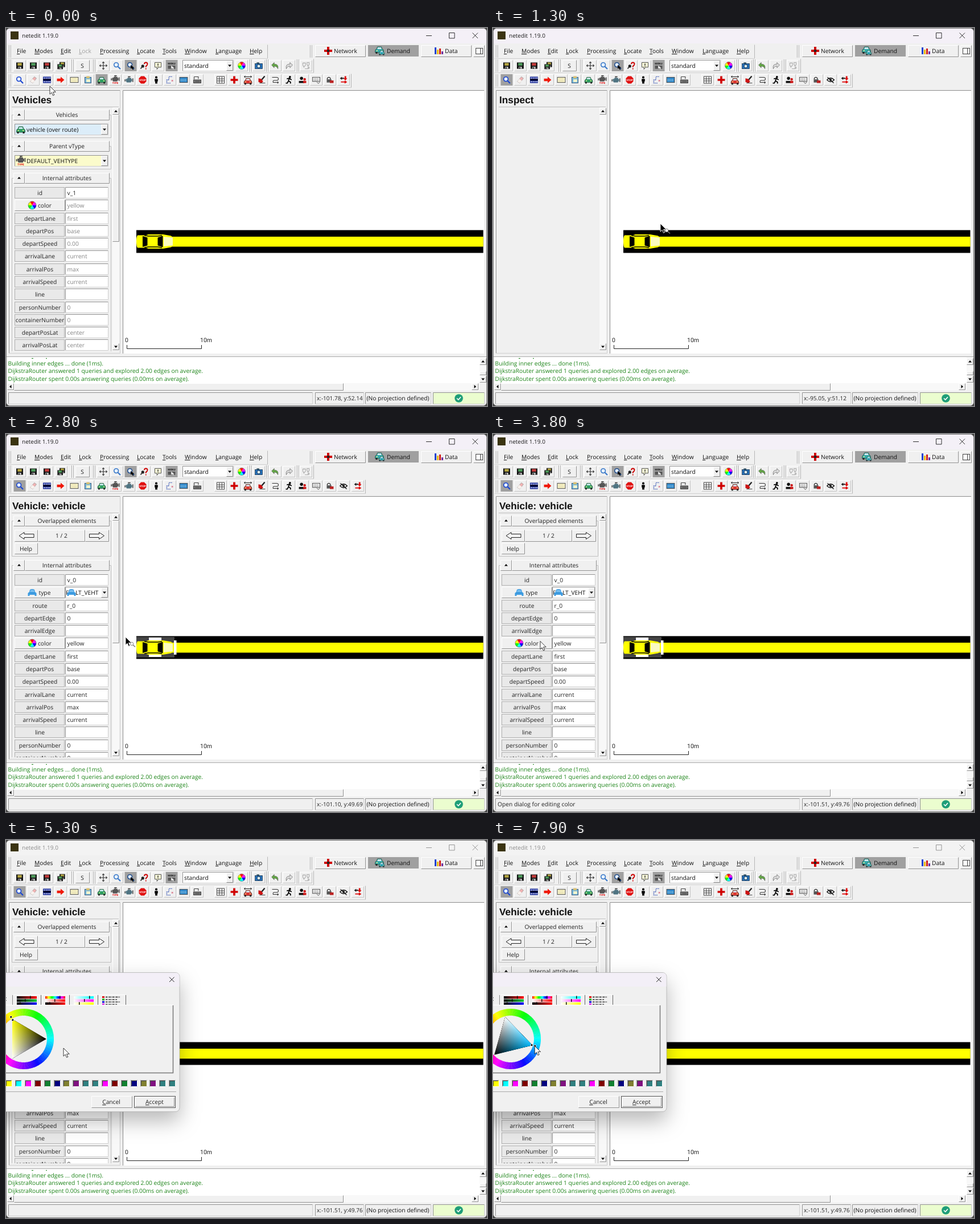
These frames come from a looping animation (845 by 663 pixels, 8 s). An HTML page:

```html
<!DOCTYPE html>
<html lang="en">
<head>
<meta charset="utf-8">
<title>netedit</title>
<style>
html, body { margin: 0; width: 100%; height: 100%; overflow: hidden; background: #444; }
svg { display: block; width: 845px; height: 663px; font: 10.25px "Open Sans", "Noto Sans", sans-serif; text-rendering: geometricPrecision; }
.head { font: bold 17.3px "Liberation Sans", Arial, sans-serif; }
.scale { font: 10.5px Roboto, sans-serif; }
.add { mix-blend-mode: plus-lighter; }
#caption, #coords { font-size: 10px; }
#dialogBox { filter: drop-shadow(0 16px 18px rgba(0,0,0,.28)); }
</style>
</head>
<body>
<svg id="stage" viewBox="0 0 845 663" xmlns="http://www.w3.org/2000/svg"></svg>
<script>
const FACE = '#f0f0f0', TRACK = '#f8f8f8';
const R = (x, y, w, h, fill, more = '') => `<rect x="${x}" y="${y}" width="${w}" height="${h}" fill="${fill}" ${more}/>`;
const P = (d, fill, more = '') => `<path d="${d}" fill="${fill}" ${more}/>`;
const S = (d, stroke, w = 1, more = '') => P(d, 'none', `stroke="${stroke}" stroke-width="${w}" ${more}`);
const C = (x, y, r, fill, more = '') => `<circle cx="${x}" cy="${y}" r="${r}" fill="${fill}" ${more}/>`;
const T = (x, y, s, fill = '#111', more = '') => `<text x="${x}" y="${y + 3.7}" fill="${fill}" ${more}>${s}</text>`;
const mid = (x, y, s, fill = '#222', more = '') => T(x, y, s, fill, 'text-anchor="middle" ' + more);
const G = (x, y, s) => `<g transform="translate(${x} ${y})">${s}</g>`;
const layer = (id, s) => `<g id="${id}">${s}</g>`;
const key = s => `<tspan text-decoration="underline">${s[0]}</tspan>${s.slice(1)}`;
const repeat = (n, f) => Array.from({ length: n }, (_, i) => f(i)).join('');

function bevel(x, y, w, h, fill, light, dark) {
  const l = x + .5, t = y + .5, r = x + w - .5, b = y + h - .5;
  return R(x, y, w, h, fill) + S(`M${l} ${b}V${t}H${r}`, light) + S(`M${l} ${b}H${r}V${t}`, dark);
}
const raised = (x, y, w, h, fill = FACE) => bevel(x, y, w, h, fill, '#fff', '#929292');
const sunken = (x, y, w, h, fill = '#fff') => bevel(x, y, w, h, fill, '#929292', '#cfcfcf');
const arrow = (x, y, dir) => G(x, y, `<path d="M-3 -1.5H3L0 2Z" transform="rotate(${dir})" fill="#000"/>`);
const scrollButton = (x, y, dir) => raised(x - 6, y - 6, 12, 12) + arrow(x, y, dir);
const grip = (x, y) => S(`M${x + .5} ${y}v22M${x + 3.5} ${y}v22`, '#aaa') + S(`M${x + 1.5} ${y}v22M${x + 4.5} ${y}v22`, '#fff');
const grad = (id, ...colors) => `<linearGradient id="${id}">${colors.map((c, i) =>
  `<stop offset="${i / (colors.length - 1)}" stop-color="${c}"/>`).join('')}</linearGradient>`;

function sector(r0, r1, a0, a1, fill) {
  const at = (r, a) => `${(r * Math.cos(a * Math.PI / 180)).toFixed(2)} ${(r * Math.sin(a * Math.PI / 180)).toFixed(2)}`;
  return P(`M${at(r0, a0)}L${at(r1, a0)}A${r1} ${r1} 0 0 1 ${at(r1, a1)}L${at(r0, a1)}A${r0} ${r0} 0 0 0 ${at(r0, a0)}Z`, fill);
}

// ---- icons, all centred on 0,0 ----
const wheelIcon = repeat(6, i => sector(0, 7, i * 60, i * 60 + 60, `hsl(${(600 - i * 60) % 360} 95% 52%)`)) + C(0, 0, 7, 'none', 'stroke="#555" stroke-width=".6"');
const floppy = c => R(-6.5, -6, 13, 12, '#151515') + R(-4, -5, 8, 5, c) + R(-3, 2, 6, 4, '#bbb') + R(-2, 3, 2, 3, '#222');
const car = c => P('M-7.5 3Q-7.5-1-5-1L-3.5-5H3.5L5-1Q7.5-1 7.5 3V5H-7.5Z', c, 'stroke="#243" stroke-width=".7"') +
  P('M-3.8-1L-2.8-4H2.8L3.8-1Z', '#cfe8f0') + R(-6.5, 4, 3, 3, '#222') + R(3.5, 4, 3, 3, '#222') + R(-5.5, 1, 2.5, 1.5, '#ee8') + R(3, 1, 2.5, 1.5, '#ee8');
const bigCar = c => P('M-7.5 6V1L-5-1L-4-5Q0-7 4-5L5-1L7.500 1V6H4.500V4H-4.500V6Z', c) + P('M-4-1L-3-4Q0-5 3-4L4-1Z', '#7cc0f0');
const lens = c => C(-1.5, -1.5, 4.2, '#e6f2ff', `stroke="${c}" stroke-width="1.8"`) + S('M2 2L6.5 6.5', c, 2.4);
const engine = c => P('M-6-2H-3V-4H4V-2H6V3H4V5H-4L-6 2Z', c) + S('M-2-6H3M0-6V-4M-7.5-1V3M7.5-3V4', '#333', 1.4);
const plus = P('M-2-7H2V-2H7V2H2V7H-2V2H-7V-2H-2Z', '#d00000');
const person = C(0, -5, 2.2, '#000') + P('M-3-2H3V3H2V7H-2V3H-3Z', '#000');
const tiny = (y, s, c) => `<text y="${y}" font-size="4.8" font-weight="bold" text-anchor="middle" fill="${c}">${s}</text>`;
const plate = c => R(-7.5, -5, 15, 10, c, 'stroke="#444"');
const hook = c => P('M-7-1L-2-6V-3Q7-3 5 6Q3 1-2 1V4Z', c, 'stroke="#555" stroke-width=".7"');
const pointer = 'M0 0V14.2L3.2 11.2L5.5 16.4L7.8 15.4L5.6 10.3H10.2Z';

const icons = {
  move: S('M0-7V7M-7 0H7M-2-5L0-7L2-5M-2 5L0 7L2 5M-5-2L-7 0L-5 2M5-2L7 0L5 2', '#333', 1.2),
  pick: lens('#234e8c') + P('M0-1V6L2 4.5L4 8L5.5 7L4 4H7Z', '#000'),
  help: S('M0-3Q0-6 3-6Q6-6 6-3Q6-1 3 1V3', '#c00', 2) + R(2, 5, 2, 2, '#c00') + C(-3, 1, 2.8, '#222') + S('M-5 3L-7 6', '#222', 1.6),
  bubble: P('M-6-6H6V3H1L-2 7V3H-6Z', '#ffffd8', 'stroke="#444"') + R(-.8, -4, 1.6, 4, '#333') + R(-.8, 1, 1.6, 1.4, '#333'),
  menu: tiny(-2, 'MENU', '#111') + R(-7, 0, 14, 6, '#555') + P('M-1 0V6L1 4.5L3 7L4 6L3 4H5Z', '#eee'),
  camera: R(-7, -4, 14, 10, '#2470b8', 'stroke="#123" stroke-width=".7"') + R(-4, -6, 5, 2, '#245') + C(0, 1, 3.2, '#dff', 'stroke="#124"'),
  undo: hook('#62a844'), redo: `<g transform="scale(-1 1)">${hook('#ddd')}</g>`,
  pins: S('M-6-5H-1V-1L-4 3L-6-1ZM2-6H6V-2L4 1L2-2ZM-2 6H5', '#aaa', 1.2) + C(5, 4, 2, '#bbb'),
  inspect: lens('#1b46d0'),
  erase: P('M-6 3L2-6L6-3L-1 6Z', '#f1b3b3', 'stroke="#999" stroke-width=".8"') + P('M-6 3L-2-2L3 2L-1 6Z', '#f8f2ee'),
  select: R(-7.5, -6, 15, 12, '#0a1e94') + R(-7.5, -2, 15, 3.5, '#05082e') + repeat(4, i => R(-6 + i * 3.5, -4.5, 2, 2, '#fff') + R(-6 + i * 3.5, 2.5, 2, 2, '#fff')),
  go: P('M-7-2.5H0V-6L7 0L0 6V2.5H-7Z', '#f01808'),
  route: plate('#fbf6c9') + S('M-5-2H5M-5 2H5', '#ccc39a'),
  clip: R(-6, -5, 12, 11, '#78b8dc', 'stroke="#357"') + R(-3, -7, 6, 4, '#d8c070') + R(-3, -1, 7, 5, '#fbf6c9'),
  car: car('#2d9f63'), type: G(0, -2, engine('#555')) + tiny(8, 'TYPE', '#d00'), engine: engine('#4f7482'),
  stop: P('M-3-7H3L7-3V3L3 7H-3L-7 3V-3Z', '#e01010') + tiny(1.8, 'STOP', '#fff'),
  person,
  walk: S('M4-6H-2V0H-6V6H2', '#4a65bb', 1.4, 'stroke-dasharray="2 1"') + R(3, 0, 3, 3, '#d89'),
  box: plate('#2b83c6') + S('M-5-2V3M-2-2V3M1-2V3M4-2V3', '#9cd4f4'),
  crate: R(-7, 0, 14, 6, '#777', 'stroke="#333"') + S('M-6-6V-1M-6-6H2V-2M-4 3H5', '#444', 1.2),
  grid: R(-7, -6.5, 14, 13, '#fff', 'stroke="#333"') + S('M-2.5-6V6M2.5-6V6M-7-2H7M-7 2H7', '#333'),
  plus, range: G(0, 2, car('#d33')) + S('M-7-6H7M-5-8L-7-6L-5-4M5-8L7-6L5-4', '#111'),
  brush: S('M6-7L0 0', '#222', 2.5) + P('M-6-3L-1-2L3 3L0 6L-6 4Z', '#c11') + S('M-4 6H7', '#333'),
  bend: S('M-6-5H2Q6-5 6-2T2 1H-2Q-5 1-4 5H6M4 3L6 5L4 7', '#333', 1.1),
  run: C(2, -5.5, 2, '#000') + S('M1-3L-1 2L3 4V7M-1 2L-3 6H-6M-4-2L1-3L5 0', '#000', 1.9),
  group: C(-2, -3, 3, '#111') + P('M-7 6V2H3V6Z', '#111') + C(4, -1, 2.4, '#c11') + R(1, 2, 6, 4, '#c11'),
  keys: R(-7, -5, 14, 8, '#f5f5f5', 'stroke="#444"') + S('M-5-2H5M-5 1H5', '#555', 1, 'stroke-dasharray="2 1"') + S('M1 4L4 7L7 4', '#444'),
  lock: S('M-5-1V-3Q-2-7 1-3V-1', '#333', 1.4) + R(-6, -1, 9, 6, '#555') + R(0, 1, 7, 5, '#b22'),
  eye: S('M-7 0Q0-7 7 0Q0 7-7 0M-6-5L6 6', '#111', 1.4) + C(0, 0, 2.2, '#111'),
  swap: P('M-7-3L-3-6V-4H1V-2H-3V0Z', '#222') + P('M2-7H5V-3H7L3.500 1L0-3H2Z', '#d00') + P('M-5 3H2V1L7 4L2 7V5H-5Z', '#d00'),
};
const cell = (x, y, s, on) => (on ? R(x - 10.5, y - 10, 21, 20, '#a0a0a0') : bevel(x - 11, y - 10, 22, 20, FACE, '#fff', '#c4c4c4')) +
  G(x, y, `<g transform="scale(.92)">${s}</g>`);

// ---- window frame and toolbars ----
function chrome() {
  const menu = [['File', 19], ['Modes', 50], ['Edit', 96], ['Processing', 165], ['Locate', 230], ['Tools', 275], ['Window', 314], ['Language', 368], ['Help', 428]];
  const tool = ['move', 0, 'pick', 'help', 'bubble', 'menu'];
  const modes = ['erase', 'select', 'go', 'route', 'clip', 0, 'type', 'engine', 'stop', 'person', 'walk', 'box', 'crate'];
  const extra = ['grid', 'plus', 'range', 'brush', 'bend', 'run', 'group', 'keys', 'lock'];
  const line = (y, x2) => S(`M3 ${y}H${x2}`, '#cfcfcf') + S(`M${x2 + .5} ${y - 24}V${y}`, '#b5b5b5');
  return R(.5, .5, 844, 662, FACE, 'rx="6" stroke="#777"') +
    P('M1 27V7Q1 1 7 1H838Q844 1 844 7V27Z', '#f4f0f7', 'id="titleBar"') + R(8, 6, 14, 14, '#3b3412') +
    layer('caption', T(28, 13.5, 'netedit 1.19.0', 'currentColor') +
      S('M738 13.5H748M778.5 8.5H788V18H778.5ZM819.5 8.5L829 18M829 8.5L819.5 18', 'currentColor', .9)) +
    grip(5, 30) + menu.map(([s, x]) => T(x, 40.5, key(s))).join('') + T(128, 40.5, key('Lock'), '#111', 'id="lock"') +
    line(53.5, 459) + grip(534, 30) +
    raised(543, 30, 89, 21) + G(566, 40, plus + R(-2, -2, 4, 4, '#222')) + T(576, 40.5, 'Network') +
    R(636, 30, 89, 20, '#a0a0a0') + G(656, 38, car('#3aa')) + G(660, 43, `<g transform="scale(.65)">${car('#26a0b8')}</g>`) + T(669, 40.5, 'Demand') +
    raised(729, 30, 89, 21) + R(753, 34, 3, 12, '#1740d0') + R(757, 38, 3, 8, '#e8b800') + R(761, 36, 3, 10, '#d02020') + R(765, 41, 3, 5, '#7030a0') + T(771, 40.5, 'Data') +
    raised(821, 30, 20, 21) + R(825.5, 35.5, 12, 10, '#fff', 'stroke="#444"') + S('M833.5 36V45', '#444') +
    grip(5, 55) + ['#b5a642', '#4d9a5a', '#c23a3a'].map((c, i) => cell(24 + 24 * i, 66, floppy(c))).join('') +
    cell(97, 66, `<g transform="translate(2 -2) scale(.8)">${floppy('#b5a642')}</g><g transform="translate(-2 2) scale(.8)">${floppy('#4d9a5a')}</g>`) +
    grip(115, 55) + raised(122, 56, 25, 20) + mid(134, 66, 'S') + grip(153, 55) +
    tool.map((n, i) => cell(171 + 24 * i, 66, n ? icons[n] : lens('#3a78c8'), i == 2 || i == 5)).join('') +
    combo(310, 66, 90, '#fff', 'standard', 3) + cell(414, 66, wheelIcon) + grip(428, 55) + cell(444, 66, icons.camera) +
    grip(457, 55) + cell(473, 66, icons.undo) + cell(497, 66, icons.redo) + grip(511, 55) + cell(527, 66, icons.pins) + line(78.5, 540) +
    grip(5, 81) + modes.map((n, i) => n ? cell(48 + 24 * i, 91, icons[n]) : '').join('') +
    extra.map((n, i) => cell(377 + 24 * i, 91, icons[n])).join('') +
    layer('barVehicles', cell(24, 91, icons.inspect) + cell(168, 91, icons.car, 1) + cell(593, 91, icons.swap) + line(104.5, 606)) +
    layer('barInspect', cell(24, 91, icons.inspect, 1) + cell(168, 91, icons.car) + cell(593, 91, icons.eye) + cell(618, 91, icons.swap) + line(104.5, 631));
}

// ---- side panel ----
function combo(x, y, w, fill, s, pad) {
  return sunken(x, y - 10, w, 20, fill) + T(x + pad, y, s) + raised(x + w - 13, y - 9, 12, 18) + arrow(x + w - 7, y, 0);
}
const header = (y, s, bottom) => S(`M13 ${y + .5}H10.5V${bottom + .5}H184.5V${y + .5}H181`, '#c0c0c0') +
  raised(13, y - 9, 20, 19) + arrow(23, y, 180) + raised(33, y - 9, 149, 19) + mid(107, y + .5, s);
const label = (y, s, icon) => icon
  ? raised(15, y - 10, 89, 20) + G(46, y, icon) + mid(68, y, s)
  : R(15.5, y - 9.5, 87, 19, '#e9e9e9', 'stroke="#b0b0b0"') + mid(59.5, y, s);
const row = (y, s, value, ink, icon) => label(y, s, icon) + sunken(104, y - 10, 76, 20) + T(107.5, y, value, ink);
const rows = (y, list, ink) => list.map(([s, v, icon], i) => row(Math.round(y + 22.29 * i), s, v, s == 'id' ? '#222' : ink, icon)).join('');
const common = [['color', 'yellow', wheelIcon], ['departLane', 'first'], ['departPos', 'base'], ['departSpeed', '0.00'], ['arrivalLane', 'current'],
  ['arrivalPos', 'max'], ['arrivalSpeed', 'current'], ['line', ''], ['personNumber', '0'], ['containerNumber', '0']];
const thumb = h => raised(187, 152, 12, h);
const wideArrow = x => P(`M${x - 13} 0L${x - 4}-6V-3H${x + 13}V3H${x - 4}V6Z`, '#f4f4f4', 'stroke="#222"');
const heading = s => T(11, 128, s, '#111', 'class="head"');

function panel() {
  const body = s => `<g clip-path="url(#panelClip)">${s}</g>`;
  const blueCar = bigCar('#3d9be0');
  return sunken(5, 109, 196, 462, FACE) + S('M10 138.5H198', '#bbb') + R(187, 139, 12, 427, TRACK) +
    scrollButton(193, 146, 180) + scrollButton(193, 559, 0) +
    layer('paneVehicles', heading('Vehicles') + thumb(223) + body(
      header(152, 'Vehicles', 192) + combo(15, 178, 165, '#dcedf9', 'vehicle (over route)', 21) + G(26, 178, car('#2d9f63')) +
      header(207, 'Parent vType', 247) + combo(15, 233, 165, '#fbfbcb', 'DEFAULT_VEHTYPE', 21) + G(26, 233, icons.type) +
      header(263, 'Internal attributes', 600) +
      rows(289, [['id', 'v_1'], ...common, ['departPosLat', 'center'], ['arrivalPosLat', 'center']], '#858585'))) +
    layer('paneInspect', heading('Inspect')) +
    layer('paneSelected', heading('Vehicle: vehicle') + thumb(215) + body(
      header(152, 'Overlapped elements', 214) + raised(15, 168, 41, 21) + raised(56, 168, 83, 21) + raised(139, 168, 42, 21) +
      G(0, 178.5, wideArrow(36)) + `<g transform="translate(195.5 178.5) scale(-1 1)">${wideArrow(36)}</g>` + mid(97.5, 178.5, '1 / 2') +
      raised(15, 191, 41, 20) + mid(35, 201, 'Help') + header(230, 'Internal attributes', 600) +
      rows(256, [['id', 'v_0'], ['type', '', blueCar], ['route', 'r_0'], ['departEdge', '0'], ['arrivalEdge', ''], ...common], '#222') +
      combo(104, 278, 76, '#fff', '', 0) + T(105, 278, 'F') + T(122, 278, 'LT_VEHT') + G(115, 278, blueCar)));
}

// ---- network view ----
function view() {
  const vehicle = P('M231 363.5H246L250 362H276L290 364.5Q294 367 294 374.5T290 384.5L276 387H250L246 385.5H231Q229 383 229 374.5T231 363.5Z', '#ff0') +
    P('M277 366L293 367.5V381.5L277 383Z', '#fbfbc0') + P('M240 365L248.500 367.500V381.500L240 384ZM275.500 364.500L266.500 367.500V381.500L275.500 384.500Z', '#000') +
    S('M243 363.8L250 365H267L274 363.8M243 385.2L250 384H267L274 385.2', '#000', 1.6);
  return R(205, 109, 635, 462, '#fff') + S('M205.500 571V109.500H840', '#8c8c8c') +
    R(229, 354.5, 609.5, 40, '#000') + R(290, 366, 548.5, 17.5, '#ff0') +
    layer('marker', R(229, 356, 67, 36, '#444') + R(290, 366, 6, 17.5, '#ff0') + R(251, 357, 22, 6, '#fff') + R(251, 385, 22, 6, '#fff') + R(295, 362, 4.5, 25, '#fff')) + vehicle +
    S('M212.500 556V562.500H343.500V556', '#222') + mid(212, 547.5, '0', '#222', 'class="scale"') + mid(351.5, 547.5, '10m', '#222', 'class="scale"');
}

function footer() {
  const green = '#1c8418';
  return R(1, 577, 831, 46, '#fff') + S('M1 576.5H844', '#aaa') + S('M45 579.500h3M70 579.500h2', green) +
    ['Building inner edges ... done (1ms).', 'DijkstraRouter answered 1 queries and explored 2.00 edges on average.',
      'DijkstraRouter spent 0.00s answering queries (0.00ms on average).'].map((s, i) => T(3.5, 588 + 13.4 * i, s, green)).join('') +
    R(832, 577, 12, 46, TRACK) + scrollButton(838, 585, 180) + raised(832, 602, 12, 7) + scrollButton(838, 616, 0) +
    R(1, 623, 831, 13, TRACK) + scrollButton(8, 629, 90) + raised(14, 623, 579, 13) + scrollButton(824, 629, -90) +
    [[4, 535], [543, 86], [631, 116]].map(([x, w]) => sunken(x, 639, w, 21, FACE)).join('') + sunken(750, 639, 91, 21, '#ebfdcf') +
    T(8, 649.5, 'Open dialog for editing color', '#222', 'id="hint"') + T(546, 649.5, '', '#222', 'id="coords"') + T(633.5, 649.5, '(No projection defined)') +
    C(795.5, 649.5, 7.3, '#1f9e78') + S('M792 649.500L794.700 652L799 647.300', '#fff', 1.6);
}

// ---- colour dialog ----
const HUB = [31, 349];
function dialog() {
  const basic = ['#ff0', '#0ff', '#f0f'], dark = ['#800000', '#108030', '#000080', '#808030', '#801080', '#308080', '#308080'];
  const swatches = [...basic, ...dark, '#f0f', ...dark];
  const sliders = [['tr', 'tg', 'tb'], ['rainbow', 'wr', 'tr'], ['wc', 'wm', 'wy']];
  const dot = r => C(r, 0, 2, '#000', 'stroke="#fff" stroke-width=".8"');
  const tri = 'M40 0L-20 34.600L-20-34.600Z';
  const well = (c, i) => G(Math.round(-1 + 16.9 * i), 421, bevel(0, 0, 12, 12, c, '#a0a0a0', '#fff') + S('M1.500 10V1.500H10', '#444'));
  return R(-200, 232.5, 505, 244, FACE, 'rx="7" stroke="#aaa" stroke-width=".7" id="dialogBox"') + P('M-10 257V233H298Q304.500 233 304.500 240V257Z', '#f3eff7') +
    S('M287 240.500L295.500 249M295.500 240.500L287 249', '#222') +
    repeat(5, i => S(`M${11.5 + 50 * i - (i == 4 ? 1 : 0)} 272V290`, i ? '#666' : '#888')) + S('M13 271.500H60M63 271.500H110M113 271.500H160M163 271.500H209', '#fff') +
    S('M-4 274L1 277M-4 284L1 281', '#333') +
    sliders.map((set, k) => set.map((id, i) => R(19 + 50 * k, 274 + 5.4 * i, 35, 4.4, `url(#${id})`) + R(42 - 9 * i + 52 * k, 273.5 + 5.4 * i, 1.5, 5, '#111')).join('')).join('') +
    repeat(4, i => R(169, 274 + 4.3 * i, 4, 3, ['#d00', '#0a0', '#00d', '#d0d'][i]) + S(`M175 ${275.5 + 4.3 * i}H${200 - i % 2 * 5}`, '#444', 1.8, 'stroke-dasharray="3 1 1 1"')) +
    S('M-5 289.500H293', '#fff') + S('M-5 408.500H293.500V290', '#777', 1.5) +
    G(...HUB, repeat(180, i => sector(41, 53, i * 2, i * 2 + 2.3, `hsl(${(i * 2 + 181) % 360} 100% 50%)`)) +
      `<g id="picker"><g style="isolation:isolate">${P(tri, '#000')}${P(tri, 'url(#toHue)', 'class="add"')}${P(tri, 'url(#toWhite)', 'class="add"')}</g>${dot(38.5)}${dot(44.5)}</g>`) +
    swatches.map(well).join('') +
    S('M-5 441.500H299', '#aaa') + raised(150, 449, 72, 21) + mid(185, 459.5, key('Cancel')) +
    R(225.5, 449.5, 72, 20, FACE, 'stroke="#555"') + raised(227, 451, 69, 17) + mid(261, 459.5, key('Accept'));
}

const fade = (id, x1, y1, x2, y2, color) => `<linearGradient id="${id}" gradientUnits="userSpaceOnUse" x1="${x1}" y1="${y1}" x2="${x2}" y2="${y2}">
  <stop stop-color="${color}" stop-opacity="0"/><stop offset="1" stop-color="${color}"/></linearGradient>`;
const stage = document.getElementById('stage');
stage.innerHTML = `<defs><clipPath id="panelClip"><rect x="6" y="140" width="180" height="427"/></clipPath>` +
  grad('tr', '#000', '#f00') + grad('tg', '#000', '#0c3') + grad('tb', '#000', '#00f') + grad('wr', '#fff', '#f00') +
  grad('wc', '#fff', '#0ff') + grad('wm', '#fff', '#f0f') + grad('wy', '#fff', '#ff0') +
  grad('rainbow', '#f00', '#ff0', '#0f0', '#0ff', '#00f', '#f0f', '#f00') +
  fade('toHue', -20, 0, 40, 0, 'currentColor') + fade('toWhite', 10, 17.3, -20, -34.6, '#fff') + '</defs>' +
  chrome() + panel() + view() + footer() +
  layer('tooltip', R(48.5, 382.5, 144, 18, '#ffffe1', 'stroke="#333"') + T(53, 392, 'Open dialog for editing color')) +
  layer('dialog', dialog()) +
  layer('cursor', layer('press', C(0, 0, 16, '#fff', 'fill-opacity=".25" stroke="#555" stroke-width="2"')) +
    P(pointer, '#fff', 'id="arrow" stroke-width=".9"') +
    layer('glass', C(11, 12, 2.8, '#fff', 'stroke="#888"') + S('M13 14L17 17.500', '#777', 1.5)));

// ---- motion: keys are [ms, a, b] ----
const PATH = [[100, 77, 102], [500, 22, 88], [950, 23, 90], [1300, 294, 343], [1700, 262, 372], [2100, 262, 373], [2800, 210, 356],
  [3450, 90, 352], [3900, 82, 365], [4900, 82, 365], [5300, 101, 365], [5500, 101, 365], [6200, 17, 417], [6400, 17, 417], [6900, 50.3, 388.5]];
const WORLD = [[1120, -101.78, 52.14], [1300, -95.05, 51.12], [1700, -97.36, 48.52], [2100, -97.36, 48.45], [2800, -101.10, 49.69], [2850, -101.51, 49.76]];
const DRAG = [[7200, 64, 0], [7900, 16, 0]];

function along(keys, t) {
  const i = keys.findIndex(k => k[0] > t);
  if (i < 1) return keys.at(i).slice(1);
  const [from, to] = [keys[i - 1], keys[i]];
  const u = (t - from[0]) / (to[0] - from[0]), e = u * u * (3 - 2 * u);
  return [1, 2].map(n => from[n] + (to[n] - from[n]) * e);
}

const el = id => document.getElementById(id);
const show = (id, on) => el(id).setAttribute('display', on ? 'inline' : 'none');

function update(t) {
  const inspecting = t >= 550, selected = t >= 2100, open = t >= 4950;
  show('barVehicles', !inspecting);
  show('barInspect', inspecting);
  show('paneVehicles', !inspecting);
  show('paneInspect', inspecting && !selected);
  show('paneSelected', selected);
  show('marker', selected);
  show('hint', t >= 3500 && !open);
  show('tooltip', t >= 4100 && !open);
  show('dialog', open);
  show('press', t >= 4600 && t < 4900);
  el('lock').setAttribute('fill', inspecting ? '#111' : '#a0a0a0');
  el('titleBar').setAttribute('fill', open ? '#f3f3f3' : '#f4f0f7');
  el('caption').setAttribute('color', open ? '#8c8c8c' : '#1a1a1a');

  const [wx, wy] = along(WORLD, t);
  el('coords').textContent = `x:${wx.toFixed(2)}, y:${wy.toFixed(2)}`;

  const angle = along(DRAG, t)[0], turn = angle * Math.PI / 180;
  const [x, y] = t < 6900 ? along(PATH, t) : [HUB[0] + 44 * Math.cos(turn), HUB[1] + 44 * Math.sin(turn)];
  const pick = t < 7150 ? -120 : angle;
  el('picker').setAttribute('transform', `rotate(${pick})`);
  el('toHue').setAttribute('color', `hsl(${180 + pick} 100% 50%)`);

  const overView = !open && x > 206 && y > 110;
  el('cursor').setAttribute('transform', `translate(${x} ${y})`);
  el('arrow').setAttribute('fill', overView ? '#000' : '#fff');
  el('arrow').setAttribute('stroke', overView ? '#fff' : '#222');
  show('glass', overView);
}

const start = performance.now();
function frame() {
  update((performance.now() - start) % 8000);
  requestAnimationFrame(frame);
}
frame();
</script>
</body>
</html>
```
